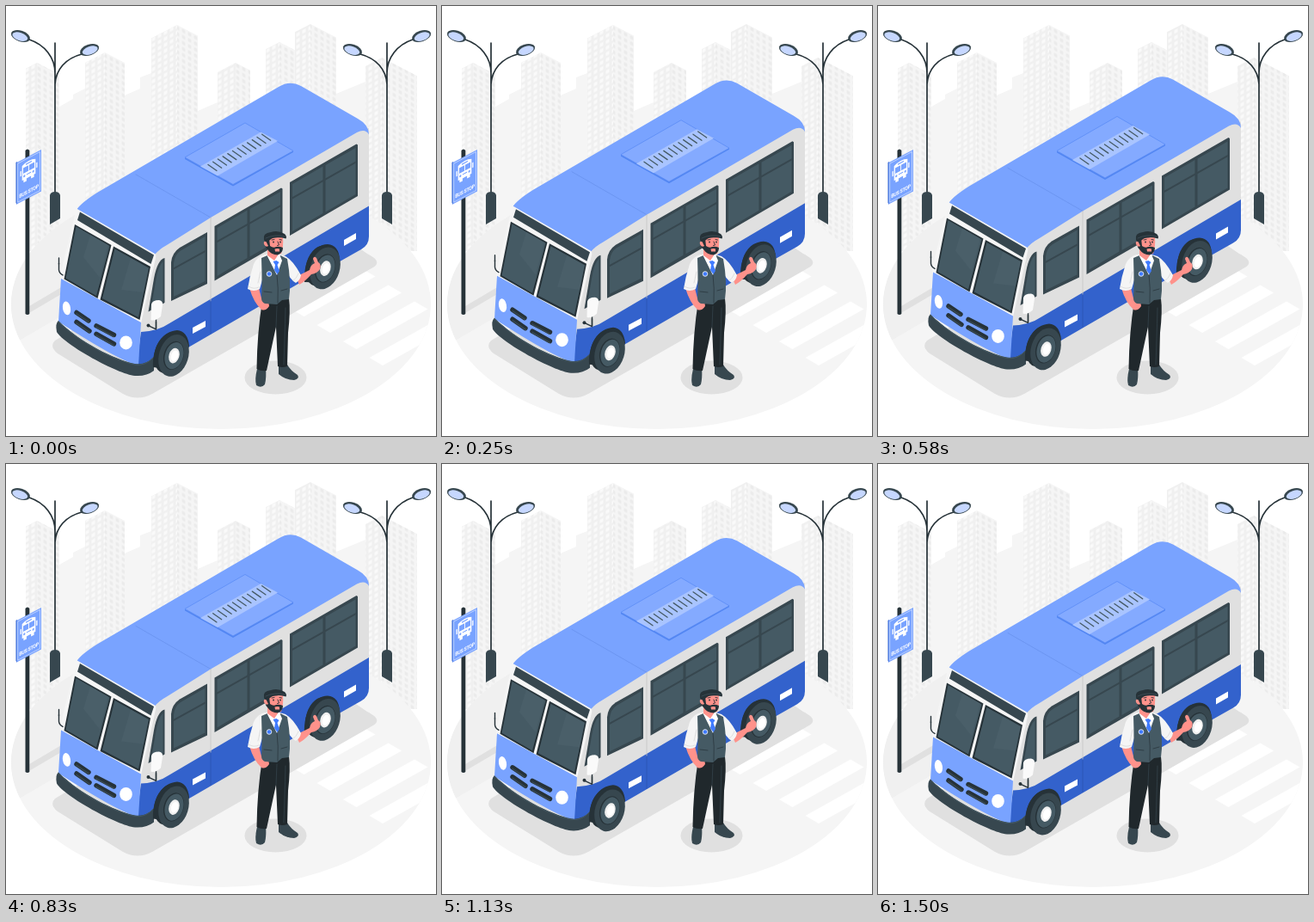
Animation of 500 by 500 pixels, one loop 1.54 s. Source, as an HTML page:

```html
<!DOCTYPE html>
<html lang="en">
<head>
<meta charset="utf-8">
<title>Bus stop</title>
<style>
  html, body { margin: 0; height: 100%; overflow: hidden; background: #fff; }
  svg { display: block; width: 100%; height: 100%; }
  .line { fill: none; stroke-linecap: round; stroke-linejoin: round; }
  .dark { fill: #263238; }
  .slate { fill: #37474f; }
  .glass { fill: #455a64; }
  .sky { fill: #79a3ff; }
  .navy { fill: #3362cc; }
  .skin { fill: #ff928b; }
  .shade { fill: #e0e0e0; }
</style>
</head>
<body>
<svg viewBox="0 0 500 500">
  <defs>
    <pattern id="pale" width="7" height="7" patternUnits="userSpaceOnUse" patternTransform="skewY(-28)">
      <path d="M1.5 1.5h4v4h-4z" fill="#fafafa"/>
    </pattern>
    <pattern id="grey" width="7" height="7" patternUnits="userSpaceOnUse" patternTransform="skewY(28)">
      <path d="M1.5 1.5h4v4h-4z" fill="#ebebeb"/>
    </pattern>
    <clipPath id="ground"><ellipse cx="250" cy="347" rx="244" ry="145"/></clipPath>

    <g id="lamp">
      <path class="line" stroke="#263238" stroke-width="1.7" d="M57 43V220M57 78C57 60 45 45 27 39M57 91C58 74 69 61 88 56"/>
      <g transform="translate(17 35) rotate(19)">
        <ellipse rx="11.5" ry="6.3" class="slate"/><ellipse cx="-.5" cy=".8" rx="9.3" ry="4.6" fill="#c6d7ff"/>
      </g>
      <g transform="translate(97 51) rotate(-19)">
        <ellipse rx="11.5" ry="6.3" class="slate"/><ellipse cx=".5" cy=".8" rx="9.3" ry="4.6" fill="#c6d7ff"/>
      </g>
      <path class="slate" d="M51 220Q52 216 57 216T63 220V247L51 254Z"/>
    </g>

    <g id="wheel">
      <ellipse cx="-7" cy="-1" rx="15.5" ry="24" transform="rotate(17)" class="dark"/>
      <ellipse rx="17" ry="25" transform="rotate(17)" class="slate"/>
      <ellipse rx="11.5" ry="17" transform="rotate(17)" class="dark"/>
      <ellipse cx=".5" rx="10.5" ry="16" transform="rotate(17)" class="glass"/>
      <ellipse cx=".5" rx="6" ry="9" transform="rotate(17)" fill="#f0f0f0"/>
      <ellipse cx="1" rx="4" ry="6.5" transform="rotate(17)" fill="#fff"/>
    </g>
  </defs>

  <g id="city">
    <path fill="#f5f5f5" d="M57 120L78 108V103L92 96V140H138V104L156 96V83L169 78V128H223V122L246 112V290H45ZM246 122H302V84L336 70V110H384V102L418 88V280H246Z"/>
  </g>

  <g clip-path="url(#ground)">
    <path fill="#f5f5f5" d="M0 190H500V500H0Z"/>
    <path fill="#f0f0f0" d="M0 398L60 363L330 207V190H0Z"/>
    <g id="crossing" fill="#fff"></g>
  </g>
  <path class="shade" d="M25 358L66 334V326L27 349ZM57 389L190 310L350 240L420 288Q440 298 425 305L170 451Q153 460 136 451L60 404Q50 396 57 389Z"/>
  <ellipse cx="313.500" cy="432" rx="36" ry="19.500" class="shade"/>

  <use href="#lamp"/>
  <use href="#lamp" transform="translate(500) scale(-1 1)"/>

  <g id="sign">
    <path class="dark" d="M22.500 168Q25 165 27.300 168V358Q25 360 22.500 358Z"/>
    <path fill="#3362cc" d="M11.500 182L13 181V231L11.500 229Z"/>
    <path class="sky" d="M12.500 182L41 167V215.500L12.500 230.500Z"/>
    <path class="line" stroke="#e4edff" stroke-width=".6" d="M14 183L39.500 169.500V214.500L14 228Z"/>
    <g transform="matrix(.87 -.47 0 1 26.500 191)" fill="#fff">
      <path d="M-9 -9Q0 -13 9 -9V8H7V11H3V8H-3V11H-7V8H-9ZM-11.500 -4H-10V2H-11.500ZM10 -4H11.500V2H10Z"/>
      <path class="sky" d="M-7.500 -6H-.5V.5H-7.500ZM.5 -6H7.500V.5H.5ZM-4 -9.300H4V-8H-4ZM-3 3H3V4.200H-3Z"/>
      <circle cx="-6" cy="4" r="1.300" class="sky"/><circle cx="6" cy="4" r="1.300" class="sky"/>
      <text y="26.500" text-anchor="middle" font-family="Roboto, sans-serif" font-weight="700" font-size="6.200" letter-spacing="-.4">BUS STOP</text>
    </g>
  </g>

  <g id="bus">
    <!-- body -->
    <path fill="#e0e0e0" d="M172 288L238 244L412 142H422V234L390 270L187 385L155 390Z"/>
    <path class="navy" d="M422 232.500V268Q422 278 413 283L390 296L345 320L212 397L172 417L152 417L157 379Q177 378 190 369Z"/>
    <path class="sky" d="M82 237Q87 229 106 217L317 94Q330 86 343 93L409 131Q422 138 422 149.500Q418 142 408 147L238 246L187 278Q178 283 173 289Z"/>
    <path class="line" stroke="#6690eb" stroke-width=".7" d="M151 196L238 246"/>
    <path class="line" stroke="#c4c4c4" stroke-width=".8" d="M238 246V343"/>
    <path class="line" stroke="#2b54b0" stroke-width=".8" d="M238 343V381"/>

    <!-- roof unit -->
    <path fill="#5286f2" d="M208 176L264 207L334 168V170L264 209.500L208 178Z"/>
    <path fill="#84aaff" stroke="#5688f4" stroke-width=".7" d="M208 176L278 136L334 168.500L264 207.500Z"/>
    <path fill="#a9c4ff" d="M226 186.500L296.500 146.500L316 157L246 197.500Z"/>
    <g id="slats" class="line" stroke="#455a64" stroke-width="1.300"></g>

    <!-- side windows -->
    <g class="slate">
      <path d="M330 205L407.500 160.500L409 161.500V221L330 267Z"/>
      <path d="M242.500 256L320 211.500L321.500 212.500V274L242.500 319.500Z"/>
      <path d="M192 298Q193 287 202 281L234 263V323L192 343Z"/>
      <path d="M184.500 293V345L165.500 355.500L172 317Q176 295 184.500 293Z"/>
    </g>
    <g class="glass">
      <path d="M333 207L368.500 186.500V241L333 262ZM371.500 185L406.500 165V219L371.500 239.500Z"/>
      <path d="M245.500 258L280.500 237.500V293L245.500 314ZM283.500 236L319 216V271L283.500 291.500Z"/>
      <path d="M195 299Q196 289 203 284.500L231.500 268V320L195 338Z"/>
      <path d="M182.500 297V343L169 350.500L174 320Q177 302 182.500 297Z"/>
    </g>
    <path class="line" stroke="#37474f" stroke-width="2" d="M332 224L408 181M244 275L320 232M194 306L232 285"/>
    <path fill="#fff" d="M217 374L232 366V373L217 381ZM393 272L407 264V271L393 279Z"/>

    <!-- front -->
    <path fill="#f5f5f5" d="M82 235.500L173 288Q175 289 174 293L157 369L63 319V313Z"/>
    <path class="slate" d="M86 239.500L172 289.500L168.500 300L83 249Z"/>
    <path class="dark" d="M80 254L122.500 278L106.500 340L67.500 317.500ZM125 279.500L168 303L155.500 365L109.500 341.500Z"/>
    <path class="glass" d="M81.500 256.500L120.500 279L105 337L69.500 316.500ZM126.500 282.500L166 304.500L154 362L112 340Z"/>
    <path fill="#536872" d="M98 266L119 278L109 316L90 292ZM145 293L166 305L160 333L134 330Z" opacity=".35"/>
    <path class="sky" d="M64 317L157 368L154 418Q130 412 61 367Z"/>
    <path class="line" stroke="#263238" stroke-width="5.400" d="M82 356.500L96 366M82 367.500L97 378M105 372L125.500 382.500M105 381.500L125.500 393"/>
    <path class="line" stroke="#37474f" stroke-width="1.600" d="M82 358L96 367.500M82 369L97 379.500M105 373.500L125 384.500M105 383L125 394.500"/>
    <ellipse cx="70.500" cy="351.500" rx="4.500" ry="8" transform="rotate(-10 70.500 351.500)" fill="#fff"/>
    <ellipse cx="139.500" cy="391.500" rx="7.300" ry="8" fill="#fff"/>
    <path class="slate" d="M61 366Q57 369 59 379C68 394 130 428 150 430Q163 431 172 424V408Q162 418 150 416C126 411 86 391 61 366Z"/>
    <path class="line" stroke="#455a64" stroke-width="1" d="M61 367C86 392 126 412 150 417Q162 419 171 409"/>

    <!-- wheels -->
    <path class="dark" d="M171 420C170 396 182 378 199 377Q211 378 213 395L202 424ZM347 321C346 295 357 278 374 277Q387 278 388 295L377 322Z"/>
    <use href="#wheel" x="195" y="406.500"/>
    <use href="#wheel" x="371" y="305"/>

    <!-- mirrors -->
    <path class="line" stroke="#263238" stroke-width="1.400" d="M61.500 290V307Q62 311 66 313M174.500 358V376L165 371.500"/>
    <path fill="#f0f0f0" d="M55.500 282Q57 278 63 278Q68 279 67 287L64 299Q57 300 55.500 295Z"/>
    <path fill="#fafafa" d="M169 347Q170 342 178 342Q183 343 182 348L180 361Q173 367 168.500 365Z"/>
    <path class="line" stroke="#263238" stroke-width="1.400" d="M61.500 293V300M174.500 367V375"/>
    <circle cx="165.500" cy="371.500" r="2" class="dark"/>
  </g>

  <g id="driver">
    <path class="slate" d="M292 422L302 421Q303 432 301 440Q297 445 291 441Q289 434 292 422ZM317 417L327 417Q331 424 339 429Q342 433 335 435Q325 435 317 428Z"/>
    <path fill="#20282c" d="M298 343L329 340Q331 354 328 380L327 419Q321 421 316 419L314 373L303 424Q297 425 291.500 422Q292 380 298 343Z"/>
    <path class="line" stroke="#37474f" stroke-width=".7" d="M315 349L314 373M325 351Q324 390 323 417"/>
    <path class="skin" d="M283 328L294 328L297 340Q306 342 306 349Q302 355 297 353Q288 345 283 328ZM337 315L353 307Q354 301 359 299L357 294Q358 290 361 293L363 298Q367 300 365 306Q362 311 355 312Q347 321 341 324Z"/>
    <path fill="#f5f5f5" d="M301 289Q291 292 288 300Q283 315 281 329Q288 333 295 329L301 308L325 306Q330 318 337 322Q342 319 343 313Q334 296 325 291L315 288Z"/>
    <path class="line" stroke="#d5d5d5" stroke-width=".7" d="M282 326Q288 330 294 327M340 311Q337 318 334 319M296 309L293 322"/>
    <path class="glass" d="M297 293L304 290L315 312L319 290L327 294Q332 321 329 341L321 342L315 347L301 346Q297 344 297 340Q298 322 297 293Z"/>
    <path class="line" stroke="#263238" stroke-width=".7" d="M315 312Q317 328 316 345M300 332L309 333M320 331L327 329"/>
    <path fill="#fff" d="M303 289L313 294L318 289L321 296L315 313Z"/>
    <path class="skin" d="M304 281H316V290L312 296L304 290Z"/>
    <path fill="#407bff" d="M310.500 297L314.500 296L317.500 298L315.500 301L318 308L315.500 312L312 307L313 301Z"/>
    <circle cx="306" cy="311.500" r="2.800" fill="#407bff" stroke="#fff" stroke-width=".8"/>
    <g transform="translate(-1)">
      <path class="skin" d="M304 270L323 269Q324 279 321 288Q308 290 304 278Z"/>
      <path class="dark" d="M303 270L307 270L308 279Q312 282 315 280Q319 279 323 281Q323 287 317 289.500Q309 289 305 283Q301 280 303 270Z"/>
      <path class="skin" d="M303.500 274Q300 273 301 277Q303 281 306 279ZM313.500 282.500Q317 281.500 319 282.500V285.500H314Z"/>
      <path class="line" stroke="#263238" stroke-width=".9" d="M310 272L313 271.500M319 271.500L321.500 272M317 274L318.500 278L316.500 278.500"/>
      <circle cx="312" cy="274.500" r=".9" class="dark"/><circle cx="320" cy="274.500" r=".9" class="dark"/>
      <path class="dark" d="M301 272Q299 264 309 263Q317 260 325 265Q328 268 326.500 270.500Q313 267 308 272Q303 276 301 272Z"/>
      <path class="line" stroke="#455a64" stroke-width=".6" d="M303 270Q313 265 325 268"/>
    </g>
  </g>
</svg>
<script>
  const draw = (id, markup) => document.getElementById(id).innerHTML += markup;
  const repeat = (count, make) => Array.from({ length: count }, (_, i) => make(i)).join('');

  // Each tower: left edge, ridge x, right edge, ridge y
  const towers = [
    [23, 36, 62, 66], [92, 115, 138, 54], [169, 199, 223, 22], [246, 267, 284, 66],
    [302, 318, 336, 42], [336, 354, 384, 21], [418, 437, 478, 60]
  ];
  const face = (edge, ridge, top, fill) =>
    `<path fill="${fill}" d="M${edge} ${top + Math.abs(edge - ridge) * .52}L${ridge} ${top}V285H${edge}Z"/>`;
  draw('city', towers.map(([left, ridge, right, top]) =>
    face(left, ridge, top, '#f0f0f0') + face(left, ridge, top, 'url(#pale)') +
    face(right, ridge, top, '#f5f5f5') + face(right, ridge, top, 'url(#grey)')).join(''));

  draw('crossing', repeat(4, i =>
    `<path d="M${331 + i * 30.5} ${352 + i * 19}l83 -46.500l15.500 9l-83 46.500Z"/>`));
  draw('slats', repeat(12, i =>
    `<path d="M${235 + i * 5.7} ${184.5 - i * 3.2}l10 7"/>`));

  const bus = document.getElementById('bus');
  const LOOP = 1540, PEAK = 705, LIFT = 10;

  // Linear bob: highest at PEAK, lowest half a loop later
  function frame() {
    const t = performance.now() % LOOP;
    const gap = Math.abs(t - PEAK);
    const away = Math.min(gap, LOOP - gap) / (LOOP / 2);
    bus.setAttribute('transform', `translate(0 ${0.8 - LIFT * (1 - away)})`);
    requestAnimationFrame(frame);
  }
  frame();
</script>
</body>
</html>
```
